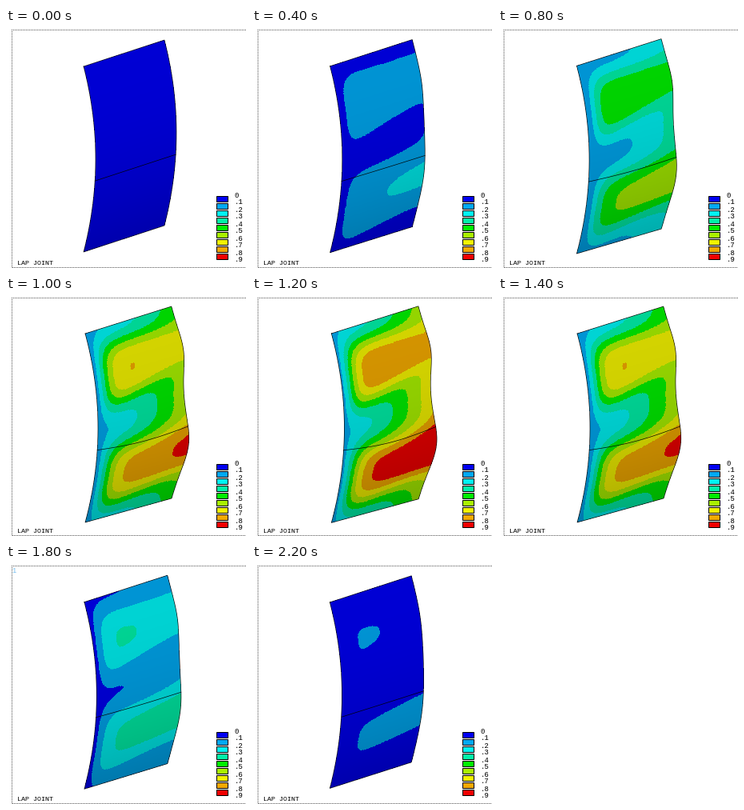
A matplotlib script that plays this animation: 300x300 px, repeating every 2400 ms.

```python
import numpy as np
import matplotlib.pyplot as plt
from matplotlib.animation import FuncAnimation
from matplotlib.patches import Rectangle

SIZE, DPI, FRAMES = 300, 100, 12
PX = 72 / DPI
LAP = 0.617
LOAD = [0, 0.143, 0.26, 0.43, 0.69, 1, 1.13]

BANDS = np.array([
    (0, 0, 255), (0, 178, 255), (0, 255, 255), (0, 255, 178), (0, 255, 0),
    (178, 255, 0), (255, 255, 0), (255, 178, 0), (255, 0, 0)]) / 255


def bell(x, mid, width, power=2):
    return np.exp(-np.abs((x - mid) / width) ** power)


def deflection(u, v, load):
    """Two ridges rising from the fixed left edge; u runs right, v down."""
    slope = (0.42 - 0.12 * (2 * v - 1) ** 2) * (0.4 + 0.6 * load)
    base = 0.15 + slope * u ** 1.4
    rise = 1 - np.exp(-(u / (0.11 + 0.06 * load)) ** 1.5)
    upper = (0.76 - 0.12 * u - base) * bell(v, 0.26 - 0.07 * u, 0.2 - 0.1 * u, 3)
    lower = (0.7 + 0.12 * u - base) * bell(v, 0.795 - 0.08 * u, 0.2 - 0.07 * u, 3)
    return load * (base + rise * (upper + lower))


def place(u, v, load):
    """Pixel position of panel point (u, v)."""
    left = 2 + 4 * v * (1 - v)
    right = 8.5 + 5 * bell(v, 0.22, 0.13) + 9.5 * bell(v, 0.71, 0.17)
    dy_left = -1 + 4 * v
    dy_right = -2 + 8 * v + 2 * np.sin(np.pi * v)
    sag = 4 * load * np.sin(np.pi * u) * bell(v, LAP, 0.13)
    x = 97 + 101 * u + 60 * v * (1 - v) + load * (left + (right - left) * u)
    y = 48 + 232 * v - 33 * u + load * (dy_left + (dy_right - dy_left) * u + sag)
    return x, y


def grid(n):
    edge = np.linspace(0, 1, n + 1)
    return edge, (edge[1:] + edge[:-1]) / 2


(u_edge, u_mid), (v_edge, v_mid) = grid(200), grid(340)
UE, VE = np.meshgrid(u_edge, v_edge)
UM, VM = np.meshgrid(u_mid, v_mid)
SHADE = (0.83 - 0.15 * VM ** 2)[..., None]

fig = plt.figure(figsize=(SIZE / DPI, SIZE / DPI), dpi=DPI, facecolor="white")
ax = fig.add_axes([0, 0, 1, 1])
ax.axis("off")


def label(x, y, s, size=8.6, color="black"):
    return ax.text(x, y, s, fontsize=size * PX, color=color,
                   family="Liberation Mono", va="baseline")


# Border, caption and legend
ax.plot([6.5, 299.5, 299.5, 6.5, 6.5], [1.5, 1.5, 298.5, 298.5, 1.5],
        color="#555555", lw=PX, ls=(0.5, (1, 1)))
label(13.5, 296.5, "LAP JOINT", 8.4)
for i, color in enumerate(BANDS):
    ax.add_patch(Rectangle((262.5, 209.5 + 9 * i), 14, 7, fc=color * 0.95,
                           ec="black", lw=PX))
for i in range(10):
    label(286, 211.5 + 9 * i, f".{i}" if i else "0", 9)
corner = label(7.5, 11, "1", color="#78bef0")

pen = dict(color="black", lw=0.65 * PX, zorder=3)
outline, = ax.plot([], [], **pen)
lap, = ax.plot([], [], **pen)
skin = []

t = np.linspace(0, 1, 80)
RIM_U = np.concatenate([t, 0 * t + 1, 1 - t, 0 * t])
RIM_V = np.concatenate([0 * t, t, 0 * t + 1, 1 - t])


def draw(i):
    step = min(i, FRAMES - i)
    load = LOAD[step]
    band = np.clip((deflection(UM, VM, load) * 10).astype(int), 0, 8)
    while skin:
        skin.pop().remove()
    x, y = place(UE, VE, load)
    skin.append(ax.pcolormesh(x, y, BANDS[band] * SHADE, zorder=2))
    outline.set_data(*place(RIM_U, RIM_V, load))
    lap.set_data(*place(t, 0 * t + LAP, load))
    corner.set_visible(step == 3)
    ax.set_xlim(0, SIZE)
    ax.set_ylim(SIZE, 0)
    return [*skin, outline, lap, corner]


anim = FuncAnimation(fig, draw, frames=FRAMES, interval=200, repeat=True,
                     repeat_delay=0, init_func=lambda: draw(0), blit=False)
plt.show()
```
